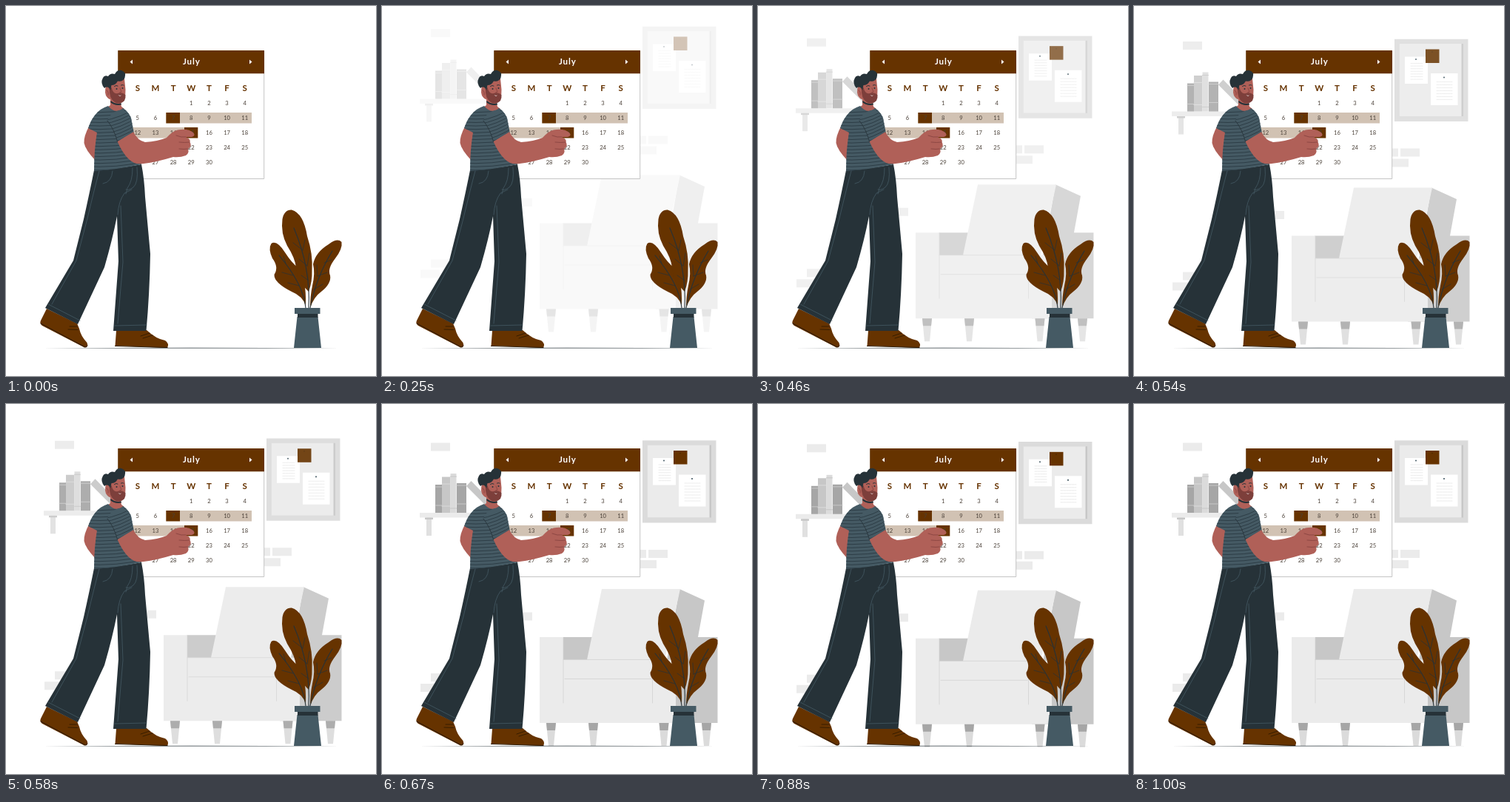
An HTML page for the animation above (1.04 s loop, 500 px wide and 500 px high).

```html
<!DOCTYPE html>
<html lang="en">
<head>
<meta charset="utf-8">
<title>Calendar</title>
<style>
  html, body { margin: 0; width: 100%; height: 100%; overflow: hidden; background: #fff; }
  svg { display: block; width: 100vw; height: 100vh; }
  text { font-family: Lato, "Open Sans", sans-serif; text-anchor: middle; }
  .line { fill: none; stroke-linecap: round; stroke-linejoin: round; }
</style>
</head>
<body>
<svg viewBox="0 0 500 500">
  <defs>
    <path id="torso" d="M138 135Q148 147 158 138Q165 142 169 151L173 172L177 185Q181 200 183 214Q150 221 119 223Q119 195 123 171L111 165C116 151 123 140 138 135Z"/>
    <clipPath id="torsoClip"><use href="#torso"/></clipPath>
    <path id="sleeve" d="M139 150Q146 141 158 140Q165 144 168 152L172 170L150.500 183Q146 166 137 155Z"/>
    <clipPath id="sleeveClip"><use href="#sleeve"/></clipPath>
  </defs>

  <g id="room" opacity="0">
    <path id="bricks" fill="#ebebeb"/>

    <!-- shelf and books -->
    <path fill="#ebebeb" d="M51 147H150V153.500H51Z"/>
    <path fill="#e0e0e0" d="M60 153.500H67V178H60Z"/>
    <path fill="#c7c7c7" d="M58 153.500H69V156H58Z"/>
    <path fill="#a6a6a6" d="M72 109H81V147H72ZM101 107H114V147H101Z"/>
    <path fill="#c7c7c7" d="M81 98.500H92.500V147H81ZM114 111L120.500 104L142 126V139Z"/>
    <path fill="#dbdbdb" d="M92.500 94H100.500V147H92.500Z"/>
    <path class="line" stroke="#c7c7c7" d="M72 112H81M72 137H81M101 110H114M101 135H114M92.500 98H100.500M92.500 141H100.500"/>
    <path class="line" stroke="#dbdbdb" d="M81 108H92M81 138H92"/>

    <!-- pin board -->
    <path fill="#dbdbdb" d="M352 49.300H451.500V160.500H352Z"/>
    <path fill="#c7c7c7" d="M358.500 55.500H445V153.500H358.500Z"/>
    <path fill="#ebebeb" d="M358.500 55.500H442.500V153.500H358.500Z"/>
    <path fill="#fff" d="M366 73H397V109.500H366ZM401 95.500H437.500V138.500H401Z"/>
    <path id="notes" class="line" stroke="#e2e2e2" stroke-width=".7" stroke-dasharray="3 .8"/>
    <path fill="#630" d="M394 63H412.500V81.500H394Z"/>
    <g fill="#455a64"><circle cx="381" cy="76.500" r="1"/><circle cx="419" cy="101" r="1.100"/><circle cx="403" cy="66.500" r=".8" fill="#4a2500"/></g>

    <!-- armchair -->
    <path fill="#c7c7c7" d="M244 315H290V347H244ZM402 250L436 265.500L427 315H453.500V431H370Z"/>
    <path fill="#ebebeb" d="M213 315H245V345.500H277L297 250H403L382 345.500H397V431H213Z"/>
    <path class="line" stroke="#d2d2d2" stroke-width=".8" d="M245 316V404M245 345.500H365.500V404M247 371.500H364"/>
    <g id="legs"></g>
  </g>

  <path fill="#263238" d="M50 462.200Q250 461.400 450 462.200Q250 463 50 462.200Z"/>

  <!-- calendar -->
  <g id="calendar">
    <path fill="#fff" stroke="#c4c4c4" d="M151.500 61H348.700V233.500H151.500Z"/>
    <path fill="#630" d="M151.300 60H349V91.300H151.300Z"/>
    <path fill="#fff" d="M167.500 75.500L171 72.500V78.500ZM332.500 75.500L329 72.500V78.500Z"/>
    <text x="250.800" y="78.600" fill="#fff" font-size="11.500" font-weight="700" letter-spacing=".9">July</text>
    <path fill="#d1c2b3" d="M235 144H332V158.500H235ZM168 164H241V178.500H168Z"/>
    <path fill="#630" d="M216.300 144H235V158.500H216.300ZM241 164H259.300V178.500H241Z"/>
  </g>

  <!-- man -->
  <g>
    <path fill="#b06058" d="M112 163Q105 176 105.500 185Q107 194 121 209L125 170Z"/>
    <path fill="#630" d="M55 409L47 425Q45 429 49 432L106 461.500Q112 462 109.500 455Q101 446 99 436L96 429ZM149 439L147.500 459L218 462Q221 456 215 452Q203 450 190 438Z"/>
    <path class="line" stroke="#2b1802" d="M47 429L106 460.500Q109 462 110 459M147.500 459.500L218 461.500"/>
    <path class="line" stroke="#2b1802" stroke-width=".8" d="M86 433L96 433M84 437L97 437.500M182 446L194 442M185 449L198 445"/>
    <path fill="#263238" d="M119 222Q150 220 183 214Q187 234 188 258L195 335Q194 390 189.500 439H145L152 345L150 284Q144 315 133 353L97 430L53 408L91 344L105 288Q113 252 119 222Z"/>
    <path class="line" stroke="#455a64" stroke-width=".8" d="M126 223Q120 245 110 287L95 344L62 403M57 403L100 425M147 432L190 431M151 282Q152 264 160 253L170 248M162 254L164 246Q171 237 171 219M144 223Q143 238 131 240M177 218Q179 239 172 245Q165 250 162 248M155 270L158 346L151 429"/>

    <path fill="#b06058" d="M138 103Q132 112 135 121Q138 126 141 126V134L137 137Q147 150 160 139L156 136L155 130Q162 126 161.500 113L160 98Q150 93 138 103Z"/>
    <path fill="#7d3f3b" d="M140 111Q139 125 147 130Q154 134 160 128Q162 124 161.500 120Q157 116 151 118Q145 120 142.500 110Z"/>
    <path fill="#fff" d="M151.500 120Q154 121.500 156 120.500Q154 123 151.500 120Z"/>
    <path fill="#263238" d="M133 111Q127 104 131 97Q133 93 138 95Q141 90 147 92Q150 86 156 87Q163 89 160.500 97Q158 103 151 101.500Q148 107 142.500 107Q142 110 141 114Q138 107 133 111Z"/>
    <g fill="#263238"><circle cx="149.500" cy="112" r="1"/><circle cx="157.500" cy="111" r="1"/></g>
    <path class="line" stroke="#263238" d="M146.500 108.500Q149 106.500 151 108M155.500 107Q157.500 106 159 107"/>
    <path class="line" stroke="#84413e" stroke-width=".8" d="M154 111L156 116L153.500 117M136 114Q139 115 138 120"/>

    <use href="#torso" fill="#455a64"/>
    <path id="torsoStripes" class="line" clip-path="url(#torsoClip)" stroke="#2d3d46"/>
    <path class="line" stroke="#263238" stroke-width="2" d="M142 129.500Q148 134.500 155 132.500"/>
    <path fill="#b06058" d="M150.500 183L172 170Q178 182 188 184Q205 183 217 178Q225 169 232 167.500Q246 165 253 171Q257 175 251 177L243 177Q250 180 248.500 184Q252 189 246 193Q248 199 243 202Q235 205 226 204Q203 211 186 213Q173 215 165 206Q157 198 150.500 183Z"/>
    <path class="line" stroke="#84413e" stroke-width=".8" d="M230 175Q237 178 243 177M234 184Q242 185 248 184M234 193Q240 194 246 193"/>
    <use href="#sleeve" fill="#455a64"/>
    <path id="sleeveStripes" class="line" clip-path="url(#sleeveClip)" stroke="#2d3d46"/>
    <path class="line" stroke="#263238" stroke-width=".8" d="M137 155Q146 166 150.500 183"/>
  </g>

  <!-- plant -->
  <g>
    <path fill="#630" d="M405 405Q401 392 386 386Q362 374 362.500 363Q369 353 360 341Q354 328 358.500 321Q366 316 377 333Q386 347 395 354Q406 367 405 405Z"/>
    <path fill="#630" d="M411 408Q411 392 414 378Q418 361 415 349Q418 333 436 322Q448 313 453.500 319Q455 328 445 341Q434 355 438 364Q440 375 426 386Q416 393 411 408Z"/>
    <path fill="#630" d="M407 384Q393 371 392 354Q391 341 380 324Q371 307 373.500 288Q376 275 386 275.500Q402 280 407 311Q415 335 413.500 358Q414 372 409 386Z"/>
    <path class="line" stroke="#263238" stroke-width="1.100" d="M405 408Q402 376 369 337M409 408Q412 354 389 300M411 408Q419 367 441 331"/>
    <path class="line" stroke="#263238" stroke-width=".7" d="M378 348L375 338M388 364L373 360M396 378L381 374M401 330L388 320M401 330L404 316M407 351L396 342M407 351L410 334M409 371L399 364M421 365L420 350M421 365L434 360M430 347L440 343M416 383L428 376"/>
    <path fill="#455a64" d="M390 408H424.500V416H390ZM393.500 420H421.500L426 462H389Z"/>
    <path fill="#263238" d="M394 416H421.500V421H394Z"/>
  </g>
</svg>
<script>
const $ = id => document.getElementById(id);
const add = (id, markup) => $(id).insertAdjacentHTML('beforeend', markup);
const range = (n, f) => Array.from({length: n}, (_, i) => f(i)).join('');

$('bricks').setAttribute('d',
  [[66, 52.5], [66, 364], [52, 378], [331, 197], [360, 197], [345, 211], [177, 281.5]]
    .map(([x, y]) => `M${x} ${y}h26v11h-26Z`).join(''));

$('notes').setAttribute('d',
  range(7, i => `M374 ${82 + i * 3.6}h16`) + range(7, i => `M409 ${107 + i * 4}h21`));

for (const x of [222, 279, 374.5, 432])
  add('legs', `<path fill="#dbdbdb" d="M${x} 431h13l-3 31h-7Z"/>
    <path fill="#a6a6a6" d="M${x} 431h13l-1 10h-11Z"/>`);

$('torsoStripes').setAttribute('d',
  range(20, i => `M105 ${143 + i * 4.6}Q150 ${146 + i * 4.6} 190 ${136 + i * 4.6}`));
$('sleeveStripes').setAttribute('d',
  range(10, i => `M130 ${155 + i * 4.6}Q155 ${152 + i * 4.6} 180 ${135 + i * 4.6}`));

const column = i => 177.8 + i * 24.15;
[...'SMTWTFS'].forEach((day, i) => add('calendar',
  `<text x="${column(i)}" y="115" fill="#630" font-size="11.5" font-weight="700">${day}</text>`));
for (let day = 1; day <= 30; day++) {
  const cell = day + 2;
  add('calendar', `<text x="${column(cell % 7)}" y="${133.8 + Math.floor(cell / 7) * 20}"
    fill="#4a4038" font-size="7.6">${day}</text>`);
}

const bezier = (a, b, u) => 3 * (1 - u) * u * ((1 - u) * a + u * b) + u ** 3;

// Ease in, overshoot slightly, settle.
function ease(x) {
  let lo = 0, hi = 1;
  for (let i = 0; i < 30; i++) {
    const mid = (lo + hi) / 2;
    if (bezier(.36, .5, mid) < x) lo = mid; else hi = mid;
  }
  return bezier(-.01, 1.38, hi);
}

const LOOP = 1040, STEPS = 25;
const start = performance.now();

function draw(now) {
  const t = Math.max(0, now - start) % LOOP;
  const step = Math.min(STEPS, Math.floor(t / LOOP * STEPS + .1) + 1);
  const p = ease(step / STEPS);
  $('room').setAttribute('opacity', step > 1 ? Math.min(1, Math.max(0, p)) : 0);
  $('room').setAttribute('transform', `translate(0 ${30 * (p - 1)})`);
  requestAnimationFrame(draw);
}
draw(start);
</script>
</body>
</html>
```
